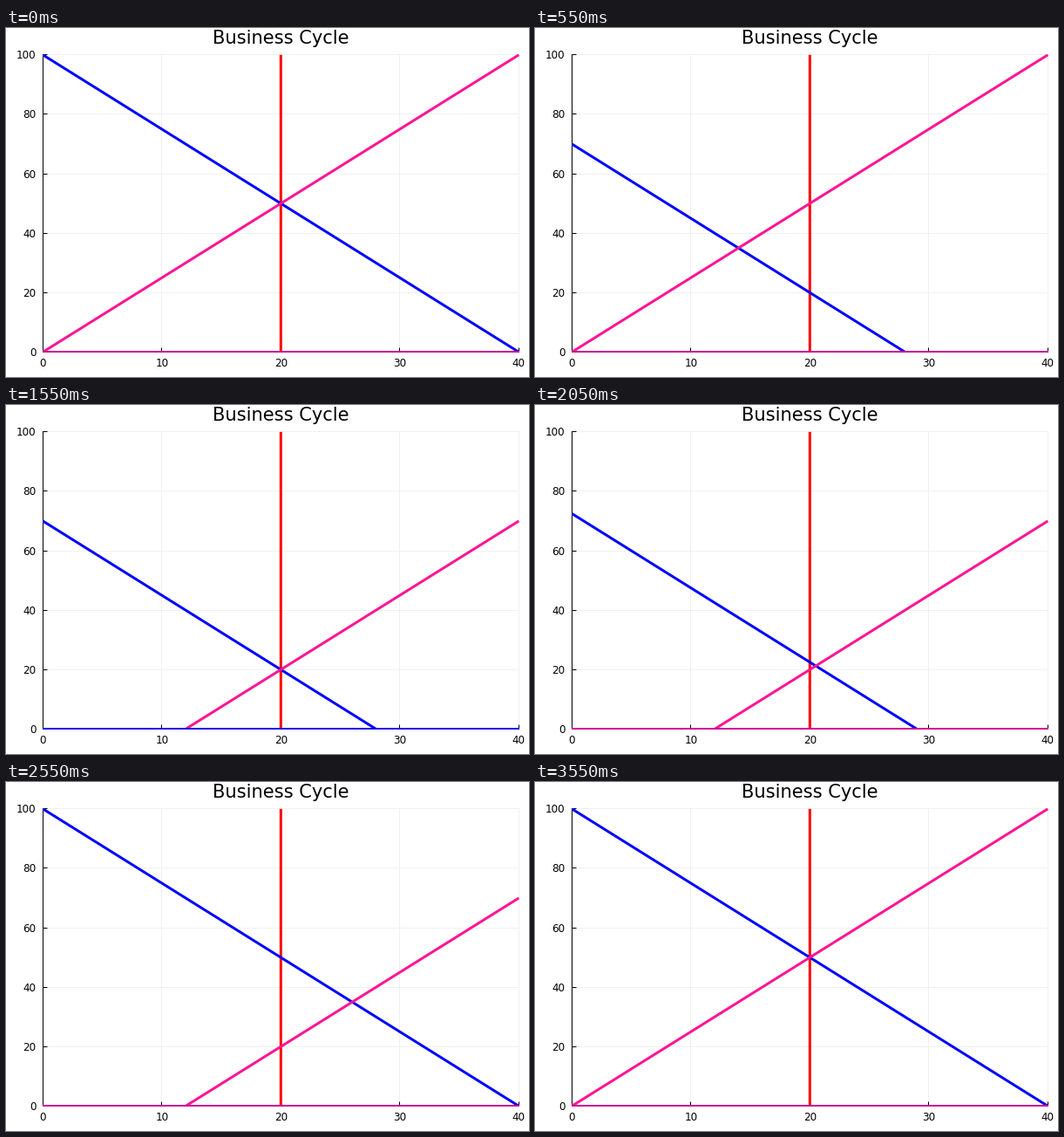
Write a matplotlib script that moves like this. It is 600x400 px and loops after 4050 ms.

```python
import matplotlib.pyplot as plt
from matplotlib.animation import FuncAnimation
from matplotlib.patches import Rectangle

W, H, DPI = 600, 400, 100
PT = 72 / DPI  # points per pixel
FRAMES, INTERVAL = 81, 50
BLUE, PINK, RED = "#0000ff", "#ff1493", "#ff0000"
BASE_MIX, BASE_BLUE = "#cc0a96", "#1a08e6"

plt.rcParams["font.family"] = "DejaVu Sans"
fig = plt.figure(figsize=(W / DPI, H / DPI), dpi=DPI, facecolor="white")
ax = fig.add_axes([0, 0, 1, 1])
ax.set_xlim(0, W)
ax.set_ylim(H, 0)
ax.axis("off")


def px(x):
    return 42.3 + 13.65 * x


def py(y):
    return 371.4 - 3.406 * y


def mid(v):
    """Centre of the pixel that holds v."""
    return int(v) + 0.5


def stroke(xs, ys, color, width, z):
    line, = ax.plot(xs, ys, color=color, lw=width * PT, zorder=z,
                    solid_capstyle="butt", snap=False)
    return line


def label(x, y, text, size, align):
    ax.text(x, y, text, fontsize=size * PT, ha=align, va="baseline",
            color="black")


left, right = mid(px(0)), mid(px(40))
top, bottom = mid(py(100)), mid(py(0))

for x in range(0, 41, 10):
    c = mid(px(x))
    stroke([c, c], [top, bottom], "#f0f0f0", 1, 1)
    stroke([c, c], [bottom, bottom - 5], "black", 1, 2)
    label(px(x), 388, str(x), 12, "center")

for y in range(0, 101, 20):
    c = mid(py(y))
    stroke([left, right], [c, c], "#f0f0f0", 1, 1)
    stroke([left, left + 5], [c, c], "black", 1, 2)
    label(34.5, py(y) + 4.5, str(y), 12, "right")

stroke([left, left], [top - 0.5, bottom + 0.5], "black", 1, 2)
stroke([left, right], [bottom, bottom], "black", 1, 2)
label(px(20), 18.3, "Business Cycle", 21, "center")

frame = Rectangle((42, 30), 547, 342, transform=ax.transData)
ends = [px(0), px(40)]
capacity = stroke([px(20)] * 2, [py(0), py(100)], RED, 3, 3)
demand = stroke(ends, [py(100), py(0)], BLUE, 3, 4)
supply = stroke(ends, [py(0), py(100)], PINK, 3, 5)
base = stroke([42, 589], [371, 371], BASE_MIX, 2, 6)
for line in (capacity, demand, supply, base):
    line.set_clip_path(frame)


def shift(step):
    """Ten even steps of 2.5, then a jump to the full 30."""
    if step > 10:
        return 30
    return 2.5 * max(step, 0)


def update(n):
    d = 100 - shift(n) + shift(n - 40)
    s = 100 - shift(n - 20) + shift(n - 60)
    demand.set_ydata([py(d), py(d - 100)])
    supply.set_ydata([py(s - 100), py(s)])
    base.set_color(BASE_BLUE if 30 < n <= 40 else BASE_MIX)
    return demand, supply, base


anim = FuncAnimation(fig, update, frames=FRAMES, interval=INTERVAL,
                     init_func=lambda: update(0), repeat=True, repeat_delay=0)
plt.show()
```
